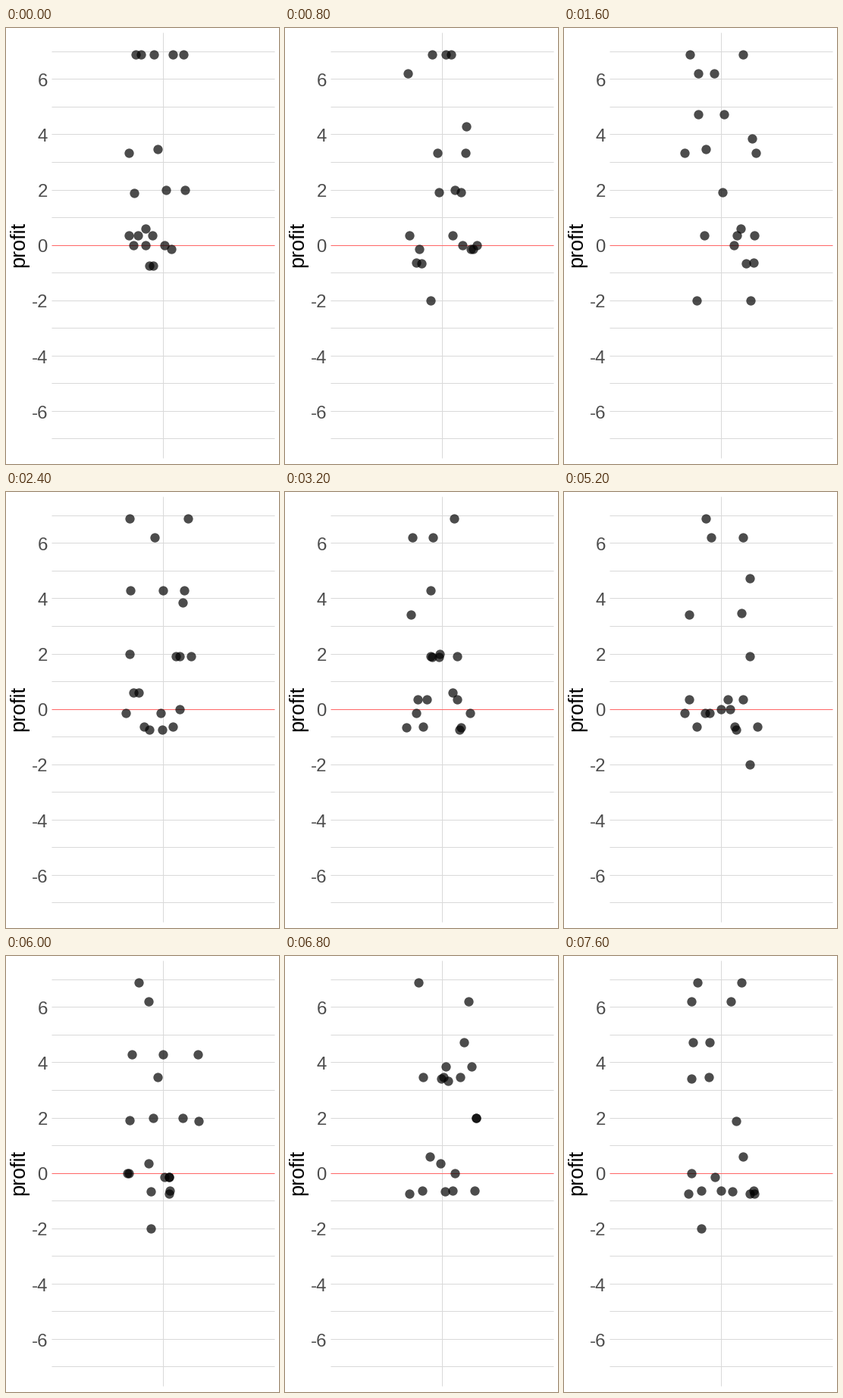
Animation, 360 px wide and 576 px high, one loop 8 s. Source, as a matplotlib script:

```python
import numpy as np
import matplotlib.pyplot as plt
from matplotlib.animation import FuncAnimation

W, H, DPI = 360, 576, 72
STEPS, HOLD = 20, 400
LEFT, RIGHT, TOP, BOTTOM = 60, 354, 6, 568
MID, SPREAD = 206.5, 49
ZERO, UNIT = 286.6, 36.53
SEED = 40

plt.rcParams["font.family"] = "Liberation Sans"

# The observed profits that every bootstrap sample is drawn from.
PROFITS = [6.89, 6.89, 6.2, 4.73, 4.29, 3.85, 3.46, 3.42, 3.32, 2.0,
           1.91, 1.88, 0.59, 0.35, 0, -0.15, -0.64, -0.66, -0.75, -2]


def y_px(value):
    return ZERO - UNIT * value


def resample(step):
    """Bootstrap sample as pixel positions with horizontal jitter."""
    rng = np.random.default_rng(SEED + step)
    values = rng.choice(PROFITS, len(PROFITS))
    xs = MID + rng.uniform(-SPREAD, SPREAD, len(PROFITS))
    return np.column_stack([xs, y_px(values)])


fig = plt.figure(figsize=(W / DPI, H / DPI), dpi=DPI, facecolor="white")
ax = fig.add_axes([0, 0, 1, 1])
ax.set_xlim(0, W)
ax.set_ylim(H, 0)
ax.axis("off")


def rule(xs, ys, color="#d9d9d9", zorder=1):
    ax.plot(xs, ys, color=color, lw=1, zorder=zorder,
            solid_capstyle="butt")


for v in range(-7, 8):
    y = y_px(v)
    if v:
        rule([LEFT, RIGHT], [y, y])
    if v % 2 == 0:
        ax.text(55, y + 9.8, str(v), size=24, color="#4d4d4d",
                ha="right", va="baseline")
rule([MID, MID], [TOP, BOTTOM])
rule([LEFT, RIGHT], [ZERO, ZERO], color="#ff6666", zorder=2)
ax.text(24, 285.5, "profit", size=27, color="black", rotation=90,
        rotation_mode="anchor", ha="center", va="baseline")

dots = ax.scatter(*resample(0).T, s=12.3 ** 2, color="black", alpha=0.7,
                  linewidths=0, zorder=3)


def update(step):
    dots.set_offsets(resample(step))
    return [dots]


anim = FuncAnimation(fig, update, frames=STEPS, interval=HOLD,
                     repeat=True, repeat_delay=0, blit=False)
plt.show()
```
